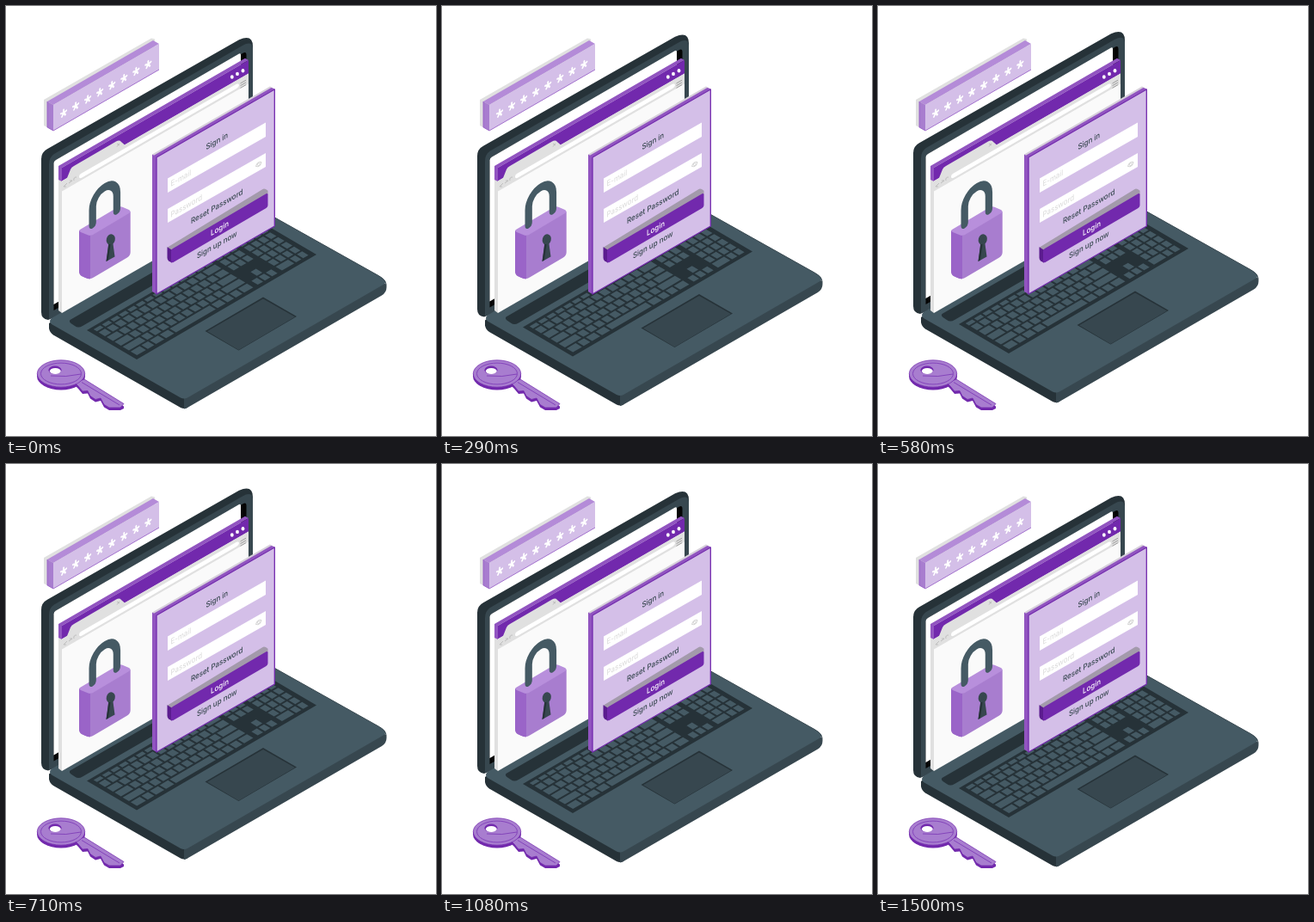
Recreate the animation shown at these times as an HTML page. Size 500 by 500 pixels, loop 1540 ms.

```html
<!DOCTYPE html>
<html lang="en">
<head>
<meta charset="utf-8">
<title>Sign in</title>
<style>
html, body { margin: 0; width: 100%; height: 100%; overflow: hidden; background: #fff; }
svg { display: block; width: 100vw; height: 100vh; }
text { font: 500 9.1px Inter, Roboto, sans-serif; fill: #37474f; }
.hint { font-weight: 400; fill: #d9d9d9; }
.light { fill: #fff; }
.deep { fill: #7229ad; }
.side { fill: #9154c0; }
.mid { fill: #a87dcf; }
.pale { fill: #d4bfe8; }
.grey { fill: #e0e0e0; }
.slate { fill: #455a64; }
.dim { fill: #37474f; }
.dark { fill: #263238; }
</style>
</head>
<body>
<svg viewBox="0 0 500 500" xmlns="http://www.w3.org/2000/svg">
  <g id="laptop">
    <!-- lid -->
    <path class="dark" d="M41 178Q41 170 48 166.300L271 39.300Q287 32.300 287 47V250L56 362L49 365Q41 364 41 356Z"/>
    <path class="dim" d="M50 184Q50 176 56 172L275 46Q286 40 287 49V250L56 362L50 364Z"/>
    <path fill="#050505" d="M55.500 184Q55.500 181 58 179L276 54.500Q279.500 53 279.500 57V225L55.500 354Z"/>
    <path fill="#fff" d="M55.500 183Q55.500 180.500 58 179L271 55.500Q273 54.500 273 57V221L55.500 347Z"/>
    <!-- base -->
    <path class="dark" d="M50 369V375Q51 380 55 382.500L203 467Q207 469 211 467L215 455L60 362Z"/>
    <path class="dim" d="M207 456V468.500Q209 468.300 211 467L437 336.500Q442.500 333 442.500 327V324L434 318Z"/>
    <path class="slate" d="M53 363L284 230L433 313.500Q443 319 441 322Q440 323.500 437 325L211 455.500Q207 457.500 203 455.500L53 370Q49 366.500 53 363Z"/>
    <path fill="none" stroke="#37474f" d="M284 230L433 313.500Q442 318.500 442 324"/>
    <path class="dark" d="M74.500 365L281 246L293 254L89 372Q84 375 80 372L75.500 369Q73 367 74.500 365Z"/>
    <path class="dark" d="M94 377L303 255L361 289L152 411Z"/>
    <g id="keys" class="slate"></g>
    <path class="dark" d="M231.500 378L299 338.500L338 361L270.500 400.500Z"/>
    <path class="dim" d="M234 378.300L299 340.500L336 361.500L270.500 400Z"/>
  </g>

  <!-- browser window -->
  <path class="grey" d="M61 186L65 188V357L61 354Z"/>
  <path class="side" d="M61 186L278 60.700L282 63L65 188V204L61 202Z"/>
  <path fill="#fafafa" d="M65 203L282 78V232L65 357Z"/>
  <path class="deep" d="M65 188L282 63V78.500L65 203.500Z"/>
  <path class="grey" d="M65 203.500L71 200L75 190Q76 187.500 79 186L128 157.500Q132 155.500 134 158L138 161.400L282 78.500V90.500L65 215.500Z"/>
  <path class="light" d="M87 195L268 90.700Q271 89.700 271 92Q271 94.200 268 95.900L88 199.700Q85 201 85 198.500Q85 196.200 87 195Z"/>
  <g fill="none" stroke="#b5b5b5" stroke-width=".8">
    <path d="M67 210L71 206M67 210L70 210M73 206L77 203M77 203L74 203M79 203Q78 199 82 199"/>
    <path d="M272.500 90L279 86.200M272.500 92.700L279 88.900M272.500 95.400L279 91.600" stroke="#8c8c8c"/>
    <path d="M129 160L132 162M129 163.500L132 159.500"/>
  </g>
  <g class="light">
    <ellipse cx="262.800" cy="82.500" rx="1.900" ry="2.200"/>
    <ellipse cx="269" cy="78.900" rx="1.900" ry="2.200"/>
    <ellipse cx="275.500" cy="75.200" rx="1.900" ry="2.200"/>
  </g>

  <!-- padlock -->
  <path class="mid" d="M85 262L98 266L144.700 239V286Q144.700 290 141 292.500L102 315.500Q98 318 94 316.500L88 314Q85 312 85 308Z"/>
  <path fill="#9a64c8" d="M85 261L98 267V317.500Q95 317.500 91 315.500L88 314Q85 312 85 308Z"/>
  <path fill="#b88fdc" d="M86 260L130 234Q133 232.500 136 234L143 237Q146 239 143 241L101 266Q98 267.500 95 266.300L87 263Q84 261.500 86 260Z"/>
  <path fill="none" stroke="#455a64" stroke-width="9.600" stroke-linecap="round" transform="matrix(.866 -.5 0 1 114.800 227)" d="M-16.300 18.500V0A16.300 16.300 0 0 1 16.300 0V18.500"/>
  <ellipse class="dim" cx="121.800" cy="271.500" rx="5" ry="6.300" transform="rotate(15 121.800 271.500)"/>
  <path class="dim" d="M119.500 274L116.500 297L126.500 291.500L124 273Z"/>
  <path class="dark" d="M119.500 277L116.500 297L119 295.600L121.500 277Z"/>

  <!-- password strip -->
  <path class="grey" d="M44 109L169 37.500L173 38.500V70L48 141L44 139Z"/>
  <path fill="#b48bd8" d="M48 111L171 40L178 44L55 115Z"/>
  <path class="mid" d="M48 111L55 115V145L48 141Z"/>
  <path class="pale" d="M55 115L178 44V74L55 145Z"/>
  <path fill="none" stroke="#9257c4" stroke-width=".8" d="M48 111V141L55 145L178 74"/>
  <g id="stars" stroke="#fff" stroke-width="2.200" stroke-linecap="round"></g>

  <!-- sign-in panel -->
  <path fill="#d6d0da" d="M170 172.500L307 93.500L312.500 96.500L175 176Z"/>
  <path class="side" d="M171.500 174L308.500 95L312.500 96.500L175 176Z"/>
  <path class="side" d="M170 172.500L175 175.500V335L170 332Z"/>
  <path class="pale" stroke="#7229ad" stroke-width="1.300" stroke-linejoin="round" d="M175 176L312.300 97V256L175 335Z"/>
  <path class="light" d="M188 200.500L302 135.500V152L188 217ZM188 236L302 171V187L188 252Z"/>
  <g fill="none" stroke="#cfcfcf" stroke-width=".9">
    <path d="M290.500 186.500Q292 180.500 297 181.500Q295.500 188 290.500 186.500Z"/>
    <circle cx="293.800" cy="184.200" r="1.500"/>
  </g>
  <g transform="translate(0 .8)">
    <path fill="#a39aab" d="M187.500 280L299 212Q301 211 304.500 214V219L192 284Z"/>
    <path fill="#5b1c8f" d="M187.500 279.500L193 283V298L189 295.500Q187.500 294 187.500 292Z"/>
    <path class="deep" d="M192 284Q192 282.500 194 281.300L302.500 217.500Q304.500 216.500 304.500 219V231Q304.500 233 302.500 234.200L195 297Q192 298.500 192 295.500Z"/>
  </g>
  <g id="labels"></g>

  <!-- key -->
  <g class="deep" transform="translate(0 3)">
    <ellipse cx="64" cy="427.500" rx="28" ry="16"/>
    <path d="M80 438L91 434L137 462.500V465L133 467H120L114 463.500L110 456L104 457.500L98 453.500L95 447.500L89 448L84 442Z"/>
  </g>
  <g class="mid" stroke="#7229ad" stroke-width=".7">
    <path d="M80 438L91 434L137 462.500L133 467H120L114 463.500L110 456L104 457.500L98 453.500L95 447.500L89 448L84 442Z"/>
    <ellipse cx="64" cy="427.500" rx="27.700" ry="15.700"/>
  </g>
  <g fill="none" stroke="#7f3eb8" stroke-width=".9">
    <ellipse cx="64" cy="427.500" rx="23.500" ry="12.400"/>
    <path d="M52 430Q70 432 87 428M88 437.500L132 464"/>
  </g>
  <ellipse class="deep" cx="57" cy="423.300" rx="7.500" ry="4.800"/>
  <ellipse class="light" cx="57.300" cy="424.500" rx="6.400" ry="3.500"/>
</svg>
<script>
const byId = id => document.getElementById(id);

function add(parent, tag, attrs, text) {
  const el = document.createElementNS('http://www.w3.org/2000/svg', tag);
  for (const name in attrs) el.setAttribute(name, attrs[name]);
  if (text) el.textContent = text;
  parent.appendChild(el);
}

// Labels lie on the left isometric plane.
[
  ['Sign in', 232.5, 167.5],
  ['E-mail', 191.5, 210, 'hint'],
  ['Password', 191.5, 246, 'hint'],
  ['Reset Password', 215, 253.5],
  ['Login', 238, 267.5, 'light'],
  ['Sign up now', 222, 294]
].forEach(([text, x, y, kind = '']) =>
  add(byId('labels'), 'text', { class: kind, transform: `matrix(.87 -.5 0 1 ${x} ${y})` }, text));

for (let i = 0; i < 8; i++) {
  let d = '';
  for (let arm = 0; arm < 5; arm++) {
    const a = (arm * 72 - 90) * Math.PI / 180;
    d += `M0 0L${3.8 * Math.cos(a)} ${3.8 * Math.sin(a)}`;
  }
  add(byId('stars'), 'path', { d, transform: `matrix(.87 -.5 0 1 ${67 + 14.05 * i} ${124.5 - 8.1 * i})` });
}

// Keyboard plane: u runs along the rows, v from back to front.
const place = (u, v) => `${94 + 209 * u + 57 * v} ${377 - 122 * u + 34 * v}`;
let keyPath = '';

function key(u, v, w, h) {
  const gu = 0.005, gv = 0.017;
  const a = u + gu, b = u + w - gu, c = v + gv, d = v + h - gv;
  keyPath += `M${place(a, c)}L${place(b, c)}L${place(b, d)}L${place(a, d)}Z`;
}

function row(u, end, v, h, widths) {
  const unit = (end - u) / widths.reduce((sum, w) => sum + w, 0);
  for (const w of widths) {
    key(u, v, w * unit, h);
    u += w * unit;
  }
}

const keys = (n, first = 1, last = 1) => [first, ...Array(n).fill(1), last];
const rowH = 0.163;
const rowTop = r => r ? 0.14 + (r - 1) * rowH : 0.035;
[
  keys(12),
  keys(12, 1, 1.8),
  keys(12, 1.5, 1.3),
  keys(11, 1.8, 2),
  keys(10, 2.3, 2.5),
  [1.3, 1, 1.2, 1.2, 5, 1.2, 1, 1, 1.3]
].forEach((widths, r) => {
  const v = rowTop(r), h = r ? rowH : 0.105;
  row(0.018, 0.675, v, h, widths);
  if (r < 3) row(0.69, 0.81, v, h, [1, 1, 1]);
  if (r === 4) key(0.73, v, 0.04, h);
  if (r === 5) row(0.69, 0.81, v, h, [1, 1, 1]);
  row(0.825, 0.982, v, h, r === 5 ? [2, 1, 1] : [1, 1, 1, 1]);
});
add(byId('keys'), 'path', { d: keyPath });

const LOOP = 1540, FLOAT = 1500, LIFT = 9;

function draw(ms) {
  const t = Math.min(ms % LOOP, FLOAT) / FLOAT;
  const y = -LIFT * (1 - Math.abs(1 - 2 * t));
  byId('laptop').setAttribute('transform', `translate(0 ${y.toFixed(3)})`);
}

const start = performance.now();
function tick(now) {
  draw(Math.max(0, now - start));
  requestAnimationFrame(tick);
}
draw(0);
requestAnimationFrame(tick);
</script>
</body>
</html>
```
